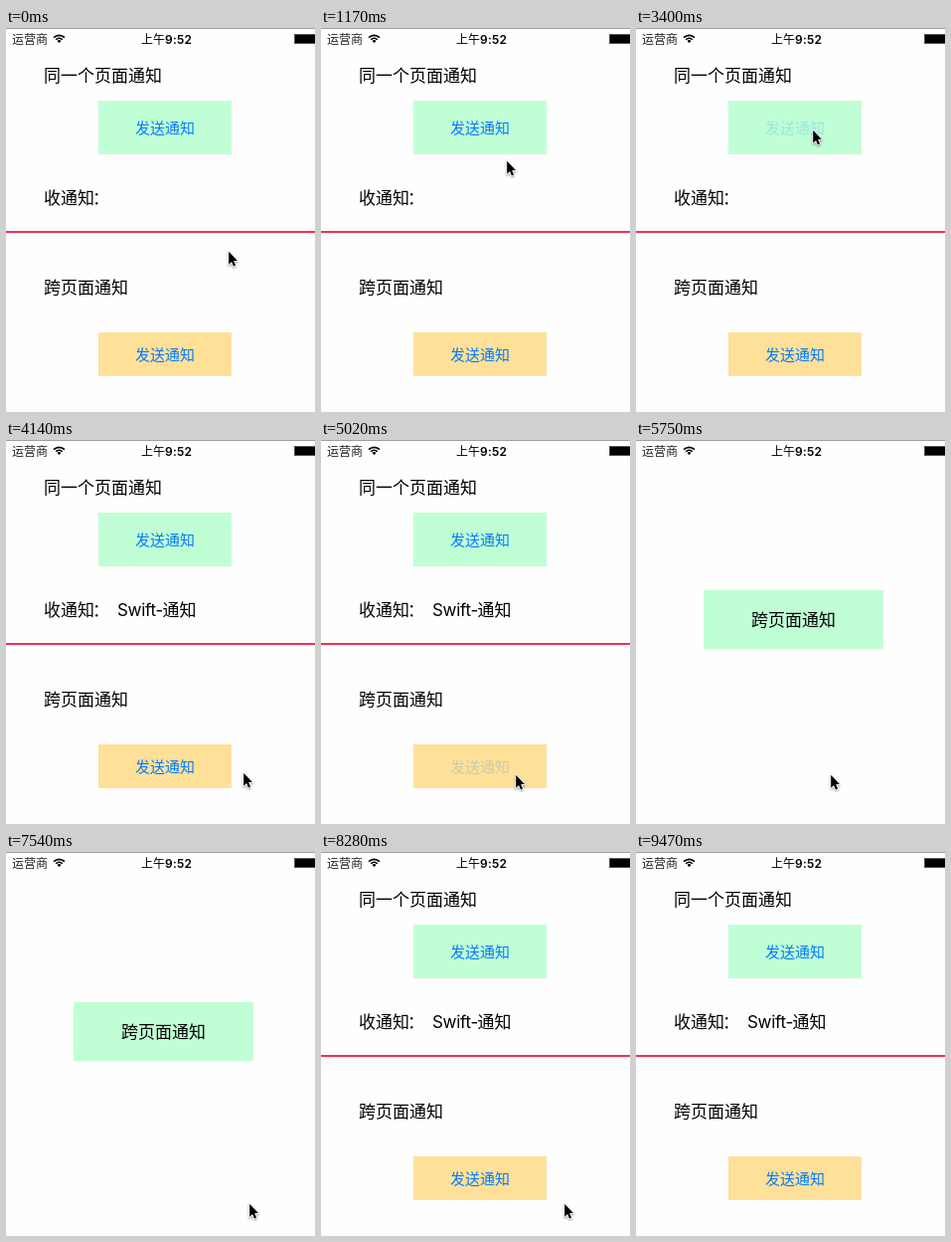
Write an HTML page with a canvas that moves like this. It is 311x386 px and loops after 9570 ms.

```html
<!DOCTYPE html>
<html lang="zh-CN">
<head>
<meta charset="utf-8">
<title>通知</title>
<style>
html, body { margin: 0; width: 100%; height: 100%; overflow: hidden; background: #fefefe; }
canvas { display: block; }
</style>
</head>
<body>
<canvas id="stage" width="311" height="386"></canvas>
<script>
const ctx = document.getElementById('stage').getContext('2d');
const W = 311, H = 386, LOOP = 9570, PAGE = 667;
const WHITE = '#fefefe', MINT = '#c0ffd5', SAND = '#ffe099', BLUE = '#007aff';
const CJK = '"Noto Sans CJK SC", "Noto Sans CJK", sans-serif';
const LATIN = 'Inter, ' + CJK;

const REFRESH = 147.6, LEAD = 280;
const PRESS_TOP = 21, PRESS_LOW = 32, RELEASE_LOW = 34, SHEET_IN = 34, SHEET_OUT = 52.6;

// Pointer glides: each starts where the one before ended; "via" bends the path.
const HOME = [223, 223];
const glides = [
  { from: -1, to: 6, via: [150, 170], end: [186, 132] },
  { from: 7, to: 10, end: [177, 101] },
  { from: 22, to: 28, via: [270, 320], end: [223, 371] },
  { from: 28, to: 31, end: [195, 335] },
  { from: 45, to: 47, end: [244, 352] },
  { from: 55, to: 57, end: [300, 400] }
];

const clamp = v => Math.max(0, Math.min(1, v));
const easeOut = p => 1 - (1 - clamp(p)) ** 2;
const easeInOut = p => p * p * (3 - 2 * p);

function pointerAt(n) {
  let pos = HOME;
  for (const { from, to, via, end } of glides) {
    if (n <= from) break;
    const u = easeInOut(clamp((n - from) / (to - from)));
    pos = pos.map((a, i) => {
      const mid = via ? via[i] : (a + end[i]) / 2;
      return (1 - u) ** 2 * a + 2 * u * (1 - u) * mid + u * u * end[i];
    });
  }
  return pos.map(Math.round);
}

function box(x, y, w, h, color) {
  ctx.fillStyle = color;
  ctx.fillRect(x, y, w, h);
}

function text(str, x, y, size, color = '#000', family = CJK, weight = 400) {
  ctx.font = `${weight} ${size}px ${family}`;
  ctx.fillStyle = color;
  ctx.fillText(str, x, y);
}

function button(y, h, color, pressed) {
  box(93, y, 134, h, color);
  ctx.globalAlpha = pressed ? 0.2 : 1;
  text('发送通知', 130, y + h / 2 + 6, 15, BLUE);
  ctx.globalAlpha = 1;
}

function mainPage(n) {
  text('同一个页面通知', 38, 54, 17);
  button(73, 54, MINT, n === PRESS_TOP);
  text('收通知', 38, 177, 17);
  text('：', 87, 177, 17);
  if (n > PRESS_TOP) {
    ctx.letterSpacing = '-0.3px';
    text('Swift-', 112, 177, 17, '#000', LATIN);
    ctx.letterSpacing = '0px';
    text('通知', 157.5, 177, 17);
  }
  box(0, 204, W, 2, '#fa2d55');
  text('跨页面通知', 38, 267, 17);
  button(306, 44, SAND, n >= PRESS_LOW && n < RELEASE_LOW);
}

function sheet(n) {
  const shown = easeOut((n - SHEET_IN) / 3) - easeOut((n - SHEET_OUT) / 1.6);
  const top = Math.round(PAGE * (1 - shown));
  box(0, top, W, PAGE, WHITE);
  box(68, top + 151, 181, 59, MINT);
  text('跨页面通知', 116, top + 187, 17);
}

function wifi(x, y) {
  const a = Math.PI * 1.25, b = Math.PI * 1.75;
  ctx.strokeStyle = ctx.fillStyle = '#000';
  ctx.lineWidth = 1.7;
  for (const r of [4.6, 7.7]) {
    ctx.beginPath();
    ctx.arc(x, y, r, a, b);
    ctx.stroke();
  }
  ctx.beginPath();
  ctx.moveTo(x, y);
  ctx.arc(x, y, 2.8, a, b);
  ctx.fill();
}

function statusBar() {
  box(0, 0, W, 1, '#a0a0a0');
  text('运营商', 6, 16, 12, '#222');
  wifi(53.5, 15);
  text('上午', 136, 16, 12, '#000', CJK, 500);
  ctx.letterSpacing = '0.2px';
  text('9:52', 160, 16, 12, '#000', LATIN, 600);
  ctx.letterSpacing = '0px';
  ctx.strokeStyle = '#555';
  ctx.lineWidth = 1;
  ctx.strokeRect(290.5, 6.5, 25, 9);
  box(291, 7, 22, 8, '#000');
}

const arrow = new Path2D('M0 0V15.5L3.6 12.2L6 17.6L8.6 16.5L6.3 11.2H11Z');

function pointer(x, y) {
  ctx.save();
  ctx.translate(x + 1.2, y + 1.8);
  ctx.scale(0.8, 0.83);
  ctx.lineJoin = 'round';
  ctx.lineWidth = 2.4;
  ctx.strokeStyle = '#fff';
  ctx.shadowColor = 'rgba(0,0,0,.4)';
  ctx.shadowBlur = 2;
  ctx.shadowOffsetY = 1;
  ctx.stroke(arrow);
  ctx.shadowColor = 'transparent';
  ctx.fillStyle = '#000';
  ctx.fill(arrow);
  ctx.restore();
}

function draw(now) {
  const n = Math.floor((now % LOOP - LEAD) / REFRESH);
  box(0, 0, W, H, WHITE);
  mainPage(n);
  sheet(n);
  statusBar();
  pointer(...pointerAt(n));
}

let start;
function tick(now) {
  start ??= now;
  draw(Math.max(0, now - start));
  requestAnimationFrame(tick);
}
draw(-0);
requestAnimationFrame(tick);
</script>
</body>
</html>
```
